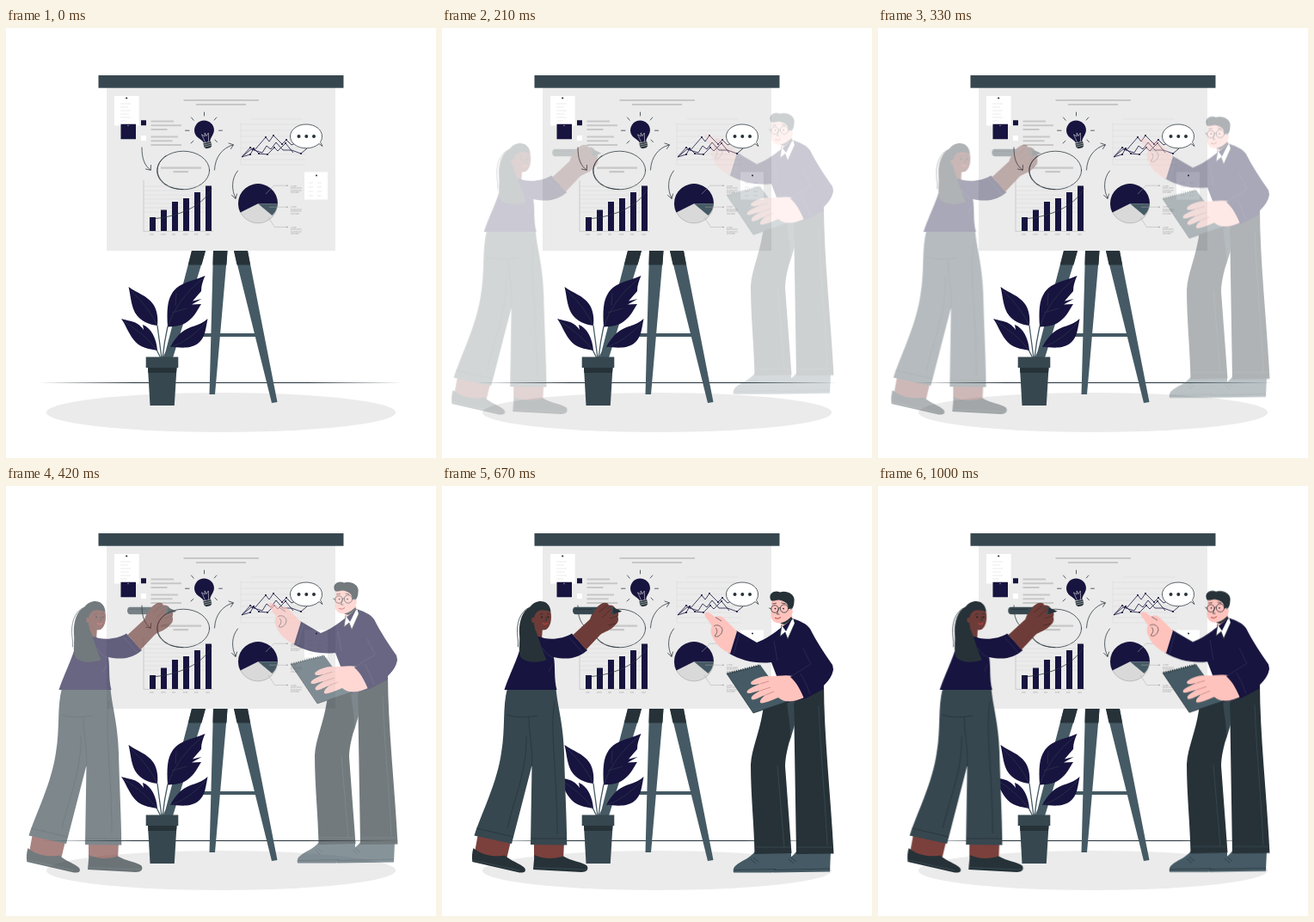
An HTML page without scripts for the animation above (1.04 s loop, 500x500 px).

```html
<!DOCTYPE html>
<html lang="en">
<head>
<meta charset="utf-8">
<title>Presentation board</title>
<style>
  html, body { margin: 0; width: 100%; height: 100%; overflow: hidden; background: #fff; }
  svg { display: block; width: 100%; height: 100%; }
  .navy { fill: #17143f; }
  .ink { fill: #263238; }
  .slate { fill: #37474f; }
  .steel { fill: #455a64; }
  .grey { fill: #c7c7c7; }
  .white { fill: #fff; }
  .brown { fill: #6e3c38; }
  .ankle { fill: #7b403c; }
  .pink { fill: #ffc3bd; }
  .line { fill: none; stroke: #263238; stroke-width: .75; stroke-linecap: round; stroke-linejoin: round; }
  .pale { fill: none; stroke: #d6d6d6; stroke-width: .5; }
  .lead { fill: none; stroke: #aaa; stroke-width: .5; }
  .vein { fill: none; stroke: #37474f; stroke-width: .5; }
  .seam { fill: none; stroke: #263238; stroke-width: .7; }
  .fold { fill: none; stroke: #455a64; stroke-width: .5; }
  .crease { fill: none; stroke: #3f3d66; stroke-width: .5; }
  .tiny { font: 2.3px Inter, Arial, sans-serif; fill: #a5a5a5; }

  .woman, .man { animation: enter 1040ms infinite; }
  .woman { --x: 1; --y: 0; }
  .man { --x: 0; --y: 1; }

  /* each span is stepped at 24 frames per second */
  @keyframes enter {
    0%      { opacity: 0;   transform: translate(calc(var(--x) * -30px), calc(var(--y) * -30px)); animation-timing-function: steps(1, end); }
    12.5%   { opacity: .08; transform: translate(calc(var(--x) * -28px), calc(var(--y) * -28px)); animation-timing-function: steps(4, end); }
    27.885% { opacity: .37; transform: translate(calc(var(--x) * -19.6px), calc(var(--y) * -19.6px)); animation-timing-function: steps(3, end); }
    40.385% { opacity: .65; transform: translate(calc(var(--x) * -11px), calc(var(--y) * -11px)); animation-timing-function: steps(2, end); }
    48.077% { opacity: .81; transform: translate(calc(var(--x) * -6px), calc(var(--y) * -6px)); animation-timing-function: steps(3, end); }
    60.577% { opacity: 1;   transform: translate(calc(var(--x) * -.3px), calc(var(--y) * -.3px)); animation-timing-function: steps(1, end); }
    64.423% { opacity: 1;   transform: translate(0, 0); animation-timing-function: steps(8, end); }
    96.154%, 100% { opacity: 1; transform: translate(calc(var(--x) * -.7px), calc(var(--y) * -.7px)); }
  }
</style>
</head>
<body>
<svg viewBox="0 0 500 500">
  <defs>
    <g id="label" class="tiny">
      <text y="2">Lorem</text><text y="4.6">ipsum dolor</text><text y="7.2">sit amet elit</text><text y="9.8">sed diam</text>
    </g>
    <path id="rules" class="pale" d="M0 0h12M0 4h9M0 8h12M0 12h10M0 16h12M0 20h8"/>
  </defs>

  <!-- floor -->
  <ellipse cx="250" cy="447" rx="203" ry="23" fill="#ebebeb"/>
  <path class="ink" d="M40 412.500L150 412.100H350L460 412.500L350 412.900H150Z"/>

  <!-- easel -->
  <path class="steel" d="M200 355H292V359H200ZM216 259H232L178 436H170ZM241 259H257.500L243 426H236.500ZM265 259H281L315.500 435L309 436Z"/>
  <path class="ink" d="M216 259H232L227.500 275.500H211.800ZM241 259H257.500L256.500 275.500H240.500ZM265 259H281L284 275.500H268.500Z"/>
  <rect x="117" y="69" width="266" height="190" fill="#ebebeb"/>
  <rect class="slate" x="107.500" y="55" width="285" height="14.700"/>

  <!-- notes and headings -->
  <path class="grey" d="M206.500 83h87.500v2h-87.500zM221 88h58v2h-58zM168.500 107.500h26.500v2h-26.500zM168.500 112.200h35.500v2h-35.500zM168.500 117h19v2h-19zM168.500 125.500h31.500v2h-31.500zM168.500 130.200h25v2h-25zM168.500 135h35.500v2h-35.500z"/>
  <path class="white" d="M126 79h28.700v34.500h-28.700zM157 125h6v6h-6zM347 167.500h27v32h-27z"/>
  <path class="navy" d="M133.500 111.700h17.500v17.500h-17.500zM157 107.200h6v6h-6z"/>
  <use href="#rules" x="133" y="88"/>
  <path class="pale" stroke-dasharray="5 5" d="M352 180h18M352 185h18M352 190h18M352 195h18"/>
  <circle class="ink" cx="140.200" cy="81.500" r="1.100"/>
  <circle class="ink" cx="361" cy="171.500" r="1"/>
  <circle cx="142" cy="113.500" r=".8" fill="#8a89a5"/>

  <!-- bulb -->
  <path class="line" d="M230.500 98v4M215.500 104l2.700 3.300M208.500 119.200h4.500M215 134l3-2.700M244.800 104l-2.600 3M247.500 119.200h4M243 130l2.500 2.700"/>
  <g transform="rotate(-13 230.500 119)">
    <path class="navy" d="M226.500 133C226.500 129 219 126 219 119A11.500 11.500 0 0 1 242 119C242 126 234.500 129 234.500 133Z"/>
    <path class="ink" d="M226 133.500h9v5l-2.200 1.800h-4.600l-2.200-1.800z"/>
    <path d="M228.500 133L226.500 123L229.500 126L230.500 122L231.500 126L234.500 123L232.500 133M226 135.500h9M226 137.700h9" fill="none" stroke="#ebebeb" stroke-width=".5"/>
  </g>

  <!-- arrows and oval -->
  <path class="line" d="M158 139C158 152 161 160 168 165M168.500 159.500L168.300 165.300L162.500 164M242.500 165C243 150 252 139 264 136M259 134L264.500 135.800L261.500 140.500M269.500 166C262 175 262 188 267 198M262.500 194.500L267 198.500L268.500 193"/>
  <ellipse class="line" cx="206.300" cy="165.500" rx="30.300" ry="22.300"/>
  <path class="line" d="M186 148.500C175 156 172 169 181 178.500C187 185 196 187.500 206 187.500" stroke-width=".5"/>
  <path class="grey" d="M180 161.500h47v2.200h-47zM194.500 166h17.500v2.200h-17.500z"/>

  <!-- bar chart -->
  <path class="pale" d="M160 184h72M160 189h72M160 194h72M160 199h72M160 204h72M160 209h72M160 214h72"/>
  <path class="lead" d="M160 177V236.300H241"/>
  <path class="navy" d="M167 220h7v16h-7zM180 211.500h7v24.500h-7zM193 202h7v34h-7zM206 198h7v38h-7zM219 191h7v45h-7zM232 183.500h7v52.500h-7z"/>
  <path class="line" d="M174 221.500C200 219 228 208 239 187"/>
  <g class="tiny">
    <text x="167" y="240.500">Duis</text><text x="180" y="240.500">Amet</text><text x="193" y="240.500">Nisl</text><text x="206" y="240.500">Enim</text><text x="219" y="240.500">Erat</text><text x="232" y="240.500">Quis</text>
  </g>

  <!-- line chart -->
  <path class="pale" d="M285 106h60M273 112h70M273 119h64M273 126h60M273 133h60M273 140h68M273 147h75M273 153h75"/>
  <path class="pale" d="M273 110V159H348"/>
  <path fill="none" stroke="#17143f" stroke-width=".8" stroke-linejoin="round" d="M274 150L284 139L289 142L302 127L306 132L311 125L321 135L326 130L332 136L343 131M274 150L284 147L288 140L294 146L304 147L312 139L316 143L325 134L334 145M274 150L285 141L298 145L303 137L308 141L314 133L322 142L332 142L343 146L350 140"/>
  <path d="M284 139h0M302 127h0M311 125h0M321 135h0M326 130h0M284 147h0M288 140h0M294 146h0M304 147h0M312 139h0M325 134h0M343 146h0" stroke="#17143f" stroke-width="2.200" stroke-linecap="round"/>
  <path d="M364 134.500C360 138 355 139.800 349 139.800C338.500 139.800 330.500 133.500 330.500 126S338.500 112 349 112S367.500 118 367.500 126C367.500 128.500 366.700 131 365.500 132.500L368 137.500Z" fill="#fff" stroke="#263238" stroke-width=".75"/>
  <path d="M340.500 126h0M349.300 126h0M358 126h0" stroke="#263238" stroke-width="4" stroke-linecap="round"/>

  <!-- pie -->
  <circle cx="293" cy="204.200" r="22.700" fill="#d9d9d9" stroke="#999" stroke-width=".5"/>
  <path class="navy" d="M293 204.200L272.500 214.500A23 23 0 1 1 316 204.500Z"/>
  <path class="steel" d="M293 204.200L316 204.500A23 23 0 0 1 309.500 218Z"/>
  <path class="lead" d="M302 193L311.500 183.200H327M306 208.200H327M305 220L312.500 231.500H327"/>
  <path d="M327 183.200h0M327 208.200h0M327 231.500h0" stroke="#999" stroke-width="1.600" stroke-linecap="round"/>
  <use href="#label" x="331" y="182.500"/><use href="#label" x="331" y="207"/><use href="#label" x="331" y="230.500"/>

  <!-- plant -->
  <path d="M176 346L181 384M188 347Q184 365 182 384M175 374L180 384M192 371Q185 376 183 384" fill="none" stroke="#455a64" stroke-width="1.300"/>
  <g class="navy">
    <path d="M142.500 301C152 308 164 311 171 321C176 328 177 338 176 346C167 345 156 341 150 331C145 321 145 311 142.500 301Z"/>
    <path d="M231.500 288C219 294 203 295 194 307C187 317 187 330 188 347.500C198 347 207 346 214 339C220 334 223 327 227 321L216 321.500L227.500 315L217 317.500L227 306C227 299 229 294 231.500 288Z"/>
    <path d="M134 338C142 341 153 340 160 351L159 345C169 349 175 361 176 375C166 373 155 372 148 362C142 354 139 345 134 338Z"/>
    <path d="M234.500 338C225 347 213 346 204 354C198 359 194 365 191 371C201 371 213 374 223 367C232 360 232 350 234.500 338Z"/>
  </g>
  <path class="vein" d="M146 306Q166 325 176 346M228 292Q199 315 188 347M137 341Q161 356 175 374M232 343Q214 363 192 371M193 331L210 326M197 323L198 308"/>
  <path class="slate" d="M165 395H198.500L195.800 439H167.500ZM162.700 382.500H200.300V395H162.700Z"/>
  <path class="ink" d="M165 395H198.500L198 401H165.400Z"/>

  <!-- woman -->
  <g class="woman">
    <path class="ankle" d="M42 404L80 413L75 434L60 435L38 426ZM107 414H142L141 435L125 438L107 432Z"/>
    <path class="ink" d="M36.500 421C46 429 60 432 73 429.500C80 436 91 439 96 444C98.500 448 96 450 90 449.500L35.300 437C34.500 431 35 426 36.500 421ZM107.500 429C118 434 130 434 141 430.500C150 436 163 437 168.500 441.500C171 446 168 449 162 449L106 446Z"/>
    <path class="fold" d="M36 435L90 447M106.500 443.500L169 446"/>
    <path class="slate" d="M76 235H132.500C134 255 141 276 142 310C143 350 145 385 145.300 417.500L103 417L104.500 325L81 416L37.500 406.500C47 378 64 345 69 310C74 281 70 258 76 235Z"/>
    <path class="seam" d="M40 398L83 408M103.500 410H145M75 266Q88 271 111 267M101 268C101 290 106 305 104.500 326M131 250C125 280 134 335 134 404M98 290C99 330 85 360 76 398"/>
    <path class="brown" d="M106 160L117 164L116 180L103 178Z"/>
    <path class="navy" d="M102 177C108 173 114 175 119 177C130 179 142 177 151 171.500L169 191C160 199 148 203 130 199C132 211 130 224 133.500 237H72.500C79 218 90 196 91 187C93 181 97 179 102 177Z"/>
    <path class="crease" d="M117 188C119 193 123 197 130 200M148 176L164 194M128 208L124 216"/>
    <path class="brown" d="M107 145C114 139 125 140 126.500 147C128 155 126 164 121 167C114 169 108 164 106 158Z"/>
    <path class="ink" d="M102 141C109 131 125 131 126.500 146C121 145 114 142 109 148C106 153 107 160 108 166C113 177 116 190 121.500 202C113 206 100 206 92 200C88 193 91 183 90 173C89 161 92 146 102 141Z"/>
    <path class="line" d="M102 141C90 146 86 161 88 176Q89 182 88.500 187"/>
    <ellipse class="brown" cx="106.500" cy="156" rx="2.300" ry="3.200"/>
    <path d="M116 152.500h0M123.500 152.500h0" stroke="#1b1b1b" stroke-width="1.800" stroke-linecap="round"/>
    <path class="line" d="M114 149.500l3-1M122 148.500l3 .5M120.500 152l1.500 4l-2 .2"/>
    <path d="M117 159.500Q120 162 123 159.500" fill="none" stroke="#b8423d" stroke-width="1.200"/>
    <path class="brown" d="M152.500 173L172 155C175 146 180 140 186 136.500C190 135 193 136 193.500 138.500C198 138 201 140 202 143C205 145 206 149 204.500 152C206 156 204 160 202 161C197 168 189 169 184 173L167.500 190.500Z"/>
    <path class="slate" d="M155 140.800H198L209 145.800L198 149.200H155C151 149.200 151 140.800 155 140.800Z"/>
    <path class="ink" d="M199 141.300L209 145.800L199 148.900ZM155 143h20v.8h-20z"/>
    <path class="brown" d="M173 156C176 146 180 140 187 136.500C192 135 195 137 193 141L187 146C191 142 198 140 198 144L195 152L184 163Z"/>
    <path d="M182 147L192 139M186 153L197 143M195 154L204 151M193 162L202 160" fill="none" stroke="#3d2422" stroke-width=".6"/>
  </g>

  <!-- man -->
  <g class="man">
    <path class="steel" d="M364 425C357 434 347 436 342 441C339 443 338 447 339 449.500H384C391 445 400 439 406 433V425ZM412 425C405 435 393 437 388 441C385 444 384 447 385 449.500L451 448.500L452 425Z"/>
    <path d="M340 446.500L388 445.500M386 446.500L451 445M362 432l6 5M359 434l6 5M406 432l6 5M403 434l6 5" fill="none" stroke="#263238" stroke-width=".6"/>
    <path class="ink" d="M376 248H403L411 254C411 285 400 300 399 326L406.500 427L363.500 428C363 395 359 360 359 324C360 305 369 288 373 262ZM409 245L444 229C444 290 452 360 455.500 427.500L412 428Z"/>
    <path class="slate" d="M401 250H409L410 278L404 298C407 282 402 268 401 250Z"/>
    <path class="fold" d="M390 325L398 420M365 420H406M413 420H454M438 255C440 310 446 370 448 418"/>
    <path class="pink" d="M394 150L406 146L409 160L402 174L394 166Z"/>
    <path class="navy" d="M394 165L408 154C416 157 424 160 428 166C435 180 445 195 454 208C456 214 454 222 443 233L444 236L423 247L401 252L383 205C365 207 348 203 333.500 194.500L342 168L366 182C377 178 386 171 394 165Z"/>
    <path class="white" d="M395 162L400 169L408 153L410 160L402 178L399 170L393 175Z"/>
    <path class="line" d="M395 162L393 175L399 170L402 178L410 160" stroke-width=".5"/>
    <path class="pink" d="M383 133C389 128 403 130 405 138L406 150C403 156 398 160 391 159.500C385 159 382 154 382.500 148Z"/>
    <path class="ink" d="M382.500 133C378.500 126 386 120 393 123.500C401 121 411 126 409.500 134C409.500 140 407 143 405 146L402.500 141C402 136 398 134 394 133C390 131 386 135 382.500 133ZM393 159.500C399 158.500 403 155 406 152L408 155L398 161Z"/>
    <ellipse class="pink" cx="405" cy="146" rx="2.800" ry="3.700"/>
    <circle class="line" cx="387" cy="143" r="4.300"/><circle class="line" cx="398" cy="142.500" r="4.700"/>
    <path class="line" d="M391.300 142Q392.500 141 393.400 142M402.500 142L406 143M383 143L380.500 142"/>
    <path d="M387.500 142.500h0M397 142.500h0" stroke="#1b1b1b" stroke-width="1.700" stroke-linecap="round"/>
    <path class="line" d="M391 144L389.500 149H392M384.500 137l4-.7M395 136l4 .7"/>
    <path d="M387 153.500Q391 155.500 394 152.500" fill="none" stroke="#b8423d" stroke-width="1"/>
    <path class="pink" d="M306 147.500C308 145 313 149 318 152.500C322 149.500 327 152 330 156L343 169L335 195C326 191 318 184 315 176C312 172 312 166 314 163L310 157C307 153 304 150 306 147.500Z"/>
    <path d="M316 163C320 160 326 163 326 168C325 174 319 177 317 174C320 172 321 167 318 165M318 152.500L325 157" fill="none" stroke="#263238" stroke-width=".6"/>
    <path class="steel" d="M331 218L370 208L401 251L362 264Z"/>
    <path d="M332 218L370 208.300" stroke="#263238" stroke-width="2.600" stroke-dasharray="1 1.600"/>
    <path class="line" d="M331 218L362 264L401 251" stroke-width=".5"/>
    <path class="pink" d="M408 221C398 219 387 222 377 221C368 222 360 226 359 229C359 232 364 231 370 230C362 233 354 237 354.500 240C356 243 363 239 370 238C364 241 358 245 360 248C363 250 370 245 376 243C371 247 368 251 371 252.500C378 252 386 248 391 246C399 253 410 251 421 246Z"/>
    <path d="M370 230L380 227M370 238L382 234M376 243L386 239" fill="none" stroke="#b5716f" stroke-width=".6"/>
    <path class="navy" d="M430 206L455 212C454 222 448 228 441 234L421 247.500C418 238 412 228 405 222C414 218 422 212 430 206Z"/>
    <path class="crease" d="M405 222L429 207L420 189M417 218Q424 230 428 242M386 180L390 203M346 170L339 196"/>
  </g>
</svg>
</body>
</html>
```
